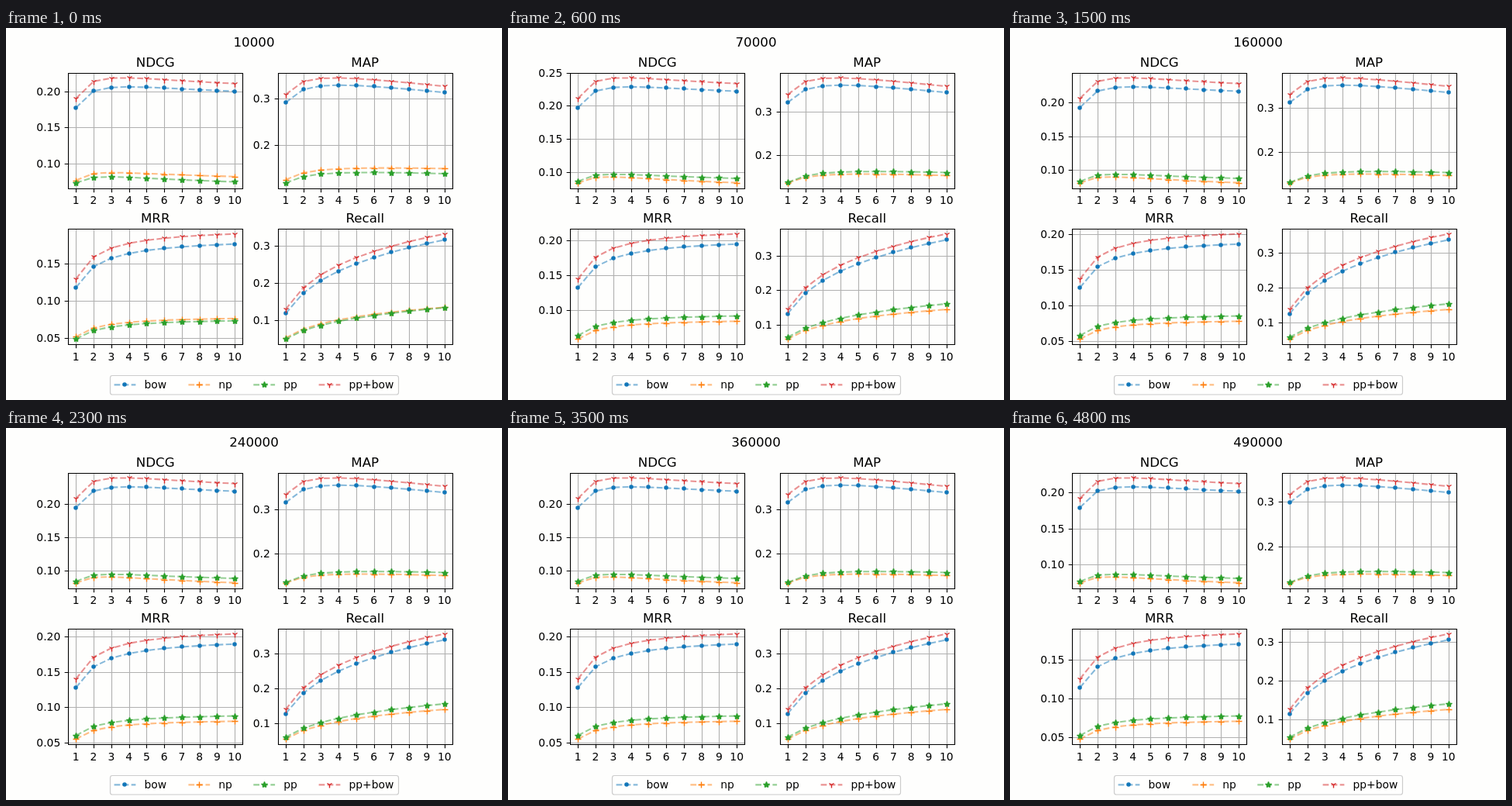
These frames come from a looping animation (640x480 px, 6300 ms). An HTML page:

```html
<!DOCTYPE html>
<html lang="en">
<head>
<meta charset="utf-8">
<title>Metrics by training size</title>
<style>
  html, body { margin: 0; width: 100%; height: 100%; overflow: hidden; background: #fefefd; }
  svg { display: block; width: 640px; height: 480px; }
  text { font-family: "DejaVu Sans", Verdana, sans-serif; font-size: 13.89px; fill: #000; }
  .title { font-size: 16.67px; text-anchor: middle; }
  .mid { text-anchor: middle; }
  .end { text-anchor: end; }
  .grid { stroke: #b0b0b0; stroke-width: 1.11; fill: none; }
  .axis { stroke: #000; stroke-width: 1.11; fill: none; }
  .line { stroke-width: 2.08; stroke-dasharray: 7.71 3.33; stroke-opacity: .5; fill: none; stroke-linejoin: round; }
  .mark { stroke-width: 1.39; stroke-linejoin: bevel; }
</style>
</head>
<body>
<svg id="stage" viewBox="0 0 640 480"><g id="plots"></g><g id="legend"></g></svg>
<script>
const STEP = 100, LAST = 48, LOOP = 6300;
const W = 225.45, H = 149.1, SPAN = H / 1.1;
const RANKS = Array.from({ length: 10 }, (_, i) => i + 1);

const lerp = (a, b, p) => a + (b - a) * p;
const snap = v => Math.floor(v + .5) + .5;
const fix = v => +v.toFixed(2);

const SERIES = [
  { name: 'bow', color: '#0f75b8', mark: 'dot', x: 139.6 },
  { name: 'np', color: '#ff7f0e', mark: 'plus', x: 235.4 },
  { name: 'pp', color: '#2ca02c', mark: 'star', x: 319.3 },
  { name: 'pp+bow', color: '#d62728', mark: 'tri', x: 403.6 }
];

// low, high: how the extremes move with training.
// drop: distance below the high, in pixels, at ranks 1, 2, 4 and 10.
// early: extra drop of a series before training settles.
const ndcg = {
  low: { plateau: .0817, start: .121, swing: .014, end: .092 },
  high: { plateau: .2384, start: .081, swing: .016, end: .075 },
  drop: { bow: [38.2, 17, 11.6, 17.3], np: [135.3, 128, 128.5, 135], pp: [133, 125.2, 124.6, 129.5], 'pp+bow': [26.5, 4.6, .1, 7.4] },
  early: { np: -6.5, pp: 3 }
};
const map = {
  low: { plateau: .1328, start: .113, swing: .019, end: .104 },
  high: { plateau: .371, start: .069, swing: .016, end: .049 },
  drop: { bow: [31.8, 15, 9.3, 18.8], np: [135.4, 128, 124.3, 125.8], pp: [134.8, 126.2, 121.4, 122], 'pp+bow': [21.5, 4.8, 0, 10.8] },
  early: { np: -6.8, pp: 1.3 }
};
const recall = {
  low: { plateau: .0551, start: .105, swing: .07, end: .127 },
  high: { plateau: .357, start: .067, swing: .016, end: .099 },
  drop: { bow: [102.8, 76.4, 48, 7.7], np: [135.5, 124.6, 113, 97.4], pp: [133.3, 121.6, 108.8, 90.2], 'pp+bow': [97.3, 69.5, 40.3, 0] },
  early: { np: -2, pp: 4 }
};

// Fast rise, overshoot and dip, plateau, then decline.
function level({ plateau, start, swing, end }, step) {
  const pts = [[0, -start], [6, swing], [15, -.7 * swing], [23, 0], [35, 0], [LAST, -end]];
  let i = 0;
  while (i < pts.length - 2 && step >= pts[i + 1][0]) i++;
  const [t0, a] = pts[i], [t1, b] = pts[i + 1], p = (step - t0) / (t1 - t0);
  return plateau * (1 + lerp(a, b, i ? p : 1 - (1 - p) ** 1.5));
}

// Cubic in log(rank) through the values at ranks 1, 2, 4 and 10.
const NODES = [1, 2, 4, 10].map(Math.log);
const WEIGHTS = RANKS.map(k => NODES.map((a, i) =>
  NODES.reduce((w, b, j) => i === j ? w : w * (Math.log(k) - b) / (a - b), 1)));
const curve = knots => WEIGHTS.map(w => w.reduce((s, c, i) => s + c * knots[i], 0));

function valuesAt(metric, step) {
  const lo = level(metric.low, step), hi = level(metric.high, step);
  const young = Math.max(0, 1 - step / 6);
  return SERIES.map(({ name }) => curve(metric.drop[name]).map((d, i) => {
    const extra = (metric.early[name] || 0) * young * (.6 + .3 * Math.log(i + 1));
    return hi - (hi - lo) * (d + extra) / SPAN;
  }));
}

// Reciprocal rank gains 1/k for each hit first found at rank k.
function reciprocal(hits) {
  let sum = 0;
  return hits.map((h, i) => sum += (h - (i ? hits[i - 1] : 0)) / (i + 1));
}

const PANELS = [
  { name: 'NDCG', x: 80, y: 57.6, tick: .05, data: n => valuesAt(ndcg, n) },
  { name: 'MAP', x: 350.55, y: 57.6, tick: .1, data: n => valuesAt(map, n) },
  { name: 'MRR', x: 80, y: 258.9, tick: .05, data: n => valuesAt(recall, n).map(reciprocal) },
  { name: 'Recall', x: 350.55, y: 258.9, tick: .1, data: n => valuesAt(recall, n) }
];

const text = (x, y, s, cls = '') => `<text x="${fix(x)}" y="${Math.round(y)}" class="${cls}">${s}</text>`;
const path = (d, cls, extra = '') => `<path d="${d}" class="${cls}" ${extra}/>`;

const R = 4.17;
const poly = pts => 'M' + pts.map(q => q.map(snap).join(' ')).join('L');
const spoke = (x, y) => poly([[0, 0], [x * R, y * R]]);
const MARKS = {
  dot: 'M-2.08 0a2.08 2.08 0 1 0 4.17 0a2.08 2.08 0 1 0 -4.17 0Z',
  plus: poly([[-R, 0], [R, 0]]) + poly([[0, -R], [0, R]]),
  star: poly(RANKS.map(i => {
    const r = i % 2 ? R * .382 : R, a = i * Math.PI / 5;
    return [r * Math.sin(a), -r * Math.cos(a)];
  })) + 'Z',
  tri: spoke(0, 1) + spoke(.8, -.5) + spoke(-.8, -.5)
};

const mark = (s, x, y) => path(MARKS[s.mark], 'mark',
  `transform="translate(${Math.round(x)} ${Math.round(y)})" fill="${s.color}" stroke="${s.color}"`);

function panel(p, step) {
  const rows = p.data(step), all = rows.flat();
  const lo = Math.min(...all), hi = Math.max(...all), pad = (hi - lo) * .05;
  const px = k => p.x + W * (k - .55) / 9.9;
  const py = v => p.y + H * (hi + pad - v) / (hi - lo + 2 * pad);
  const l = snap(p.x), r = snap(p.x + W), t = snap(p.y), b = snap(p.y + H);
  let grid = '', ticks = '', labels = '', lines = '';

  for (const k of RANKS) {
    const x = snap(px(k));
    grid += `M${x} ${t}V${b}`;
    ticks += `M${x} ${b}v4.86`;
    labels += text(px(k), p.y + H + 20.6, k, 'mid');
  }
  for (let n = Math.ceil((lo - pad) / p.tick); n * p.tick <= hi + pad; n++) {
    const v = n * p.tick, y = snap(py(v));
    grid += `M${l} ${y}H${r}`;
    ticks += `M${l} ${y}h-4.86`;
    labels += text(p.x - 9.72, py(v) + 5, v.toFixed(p.tick < .1 ? 2 : 1), 'end');
  }
  SERIES.forEach((s, i) => {
    const pts = rows[i].map((v, k) => [px(k + 1), py(v)]);
    lines += path('M' + pts.map(q => q.map(fix).join(' ')).join('L'), 'line', `stroke="${s.color}"`);
    lines += pts.map(q => mark(s, ...q)).join('');
  });
  return path(grid, 'grid') + path(ticks, 'axis') + lines +
    path(`M${l} ${t}H${r}V${b}H${l}Z`, 'axis') + labels +
    text(p.x + W / 2, p.y - 8, p.name, 'title');
}

function legend() {
  const box = '<rect x="134.5" y="448.5" width="372" height="24.5" rx="2.8" fill="#fff" fill-opacity=".8" stroke="#ccc" stroke-width="1.2"/>';
  return box + SERIES.map(s =>
    path(`M${s.x} 460.4h27.78`, 'line', `stroke="${s.color}"`) +
    mark(s, s.x + 13.89, 460.4) + text(s.x + 38.9, 465, s.name)).join('');
}

const plots = document.getElementById('plots');
document.getElementById('legend').innerHTML = legend();

let shown = -1;
function draw() {
  const step = Math.min(LAST, Math.floor(performance.now() % LOOP / STEP));
  if (step !== shown) {
    shown = step;
    plots.innerHTML = text(320, 24, 10000 * (step + 1), 'title') +
      PANELS.map(p => panel(p, step)).join('');
  }
  requestAnimationFrame(draw);
}
draw();
</script>
</body>
</html>
```
